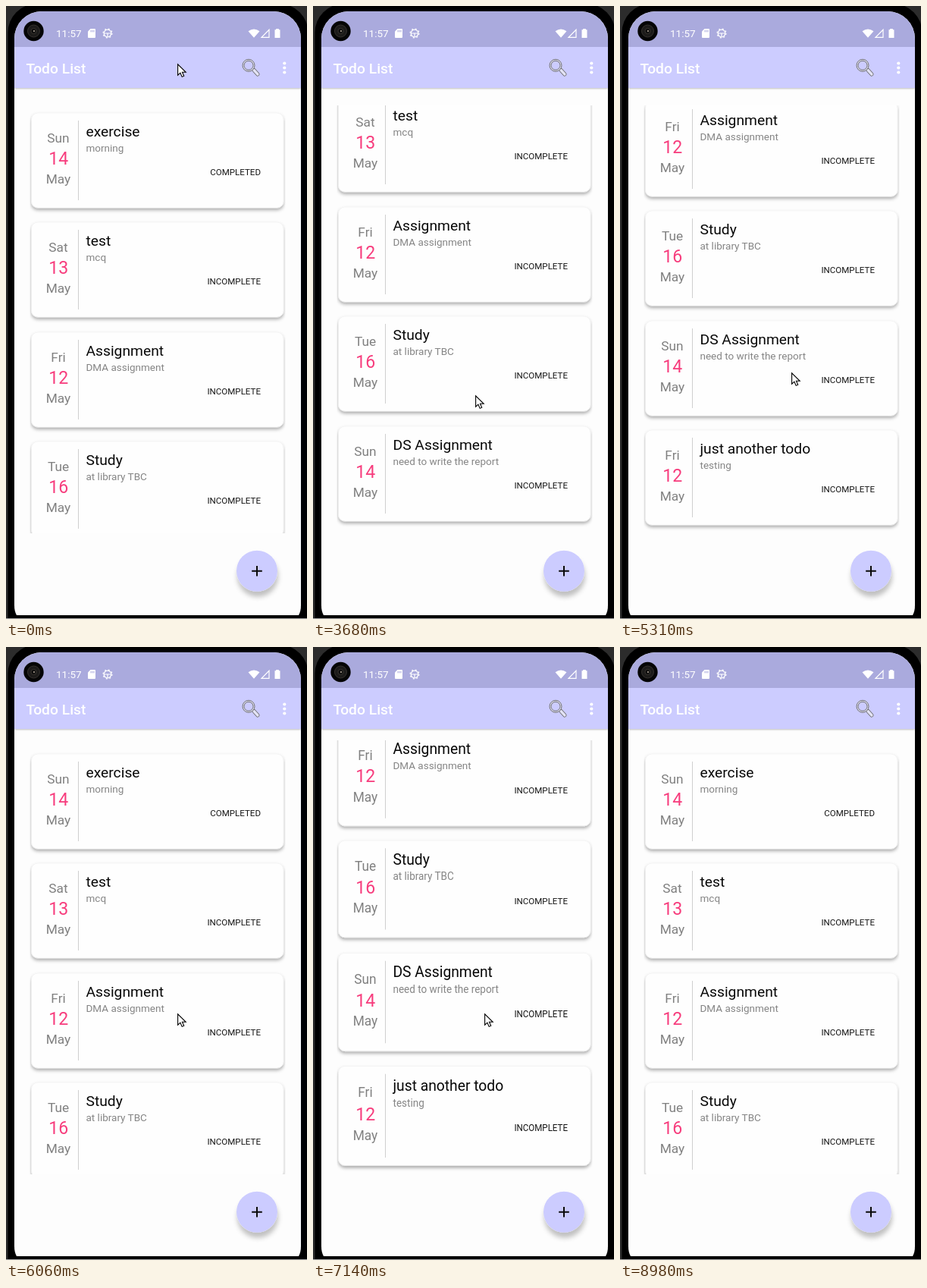
Animation of 397x808 px, one loop 9790 ms. Source, as an HTML page:

```html
<!DOCTYPE html>
<html lang="en">
<head>
<meta charset="utf-8">
<title>Todo List</title>
<style>
  html, body { margin: 0; width: 100%; height: 100%; overflow: hidden; background: #000; }
  svg { display: block; width: 397px; height: 808px; font-family: Roboto, sans-serif; }
  .day { font-size: 17.3px; fill: #808080; text-anchor: middle; }
  .date { font-size: 23.1px; fill: #f73d7d; text-anchor: middle; }
  .title { font-size: 19.26px; fill: #080808; }
  .note { font-size: 13.5px; fill: #858585; }
  .status { font-size: 11.56px; fill: #151515; text-anchor: end; }
</style>
</head>
<body>
<svg viewBox="0 0 397 808">
  <defs>
    <clipPath id="listClip"><rect id="listBox" x="31.5" width="337"/></clipPath>
    <clipPath id="screenClip"><path d="M11 43a36 36 0 0 1 36-36H353a36 36 0 0 1 36 36V790Q389 798 386 803H14Q11 798 11 790Z"/></clipPath>
    <filter id="cardShadow" x="-5%" y="-10%" width="110%" height="125%">
      <feDropShadow dx="0" dy="2.8" stdDeviation="1.9" flood-opacity=".32"/>
    </filter>
    <filter id="fabShadow" x="-30%" y="-30%" width="160%" height="170%">
      <feDropShadow dx="1" dy="7" stdDeviation="3.2" flood-opacity=".24"/>
    </filter>
    <filter id="barShadow" x="-5%" y="-10%" width="110%" height="130%">
      <feDropShadow dx="0" dy="1" stdDeviation="1" flood-opacity=".25"/>
    </filter>
  </defs>

  <rect width="397" height="808" fill="#2c2c2c"/>
  <rect x="2.5" y="-3" width="396" height="860" rx="38" fill="#000"/>
  <rect y="807" width="397" height="1" fill="#aaa"/>

  <g clip-path="url(#screenClip)">
    <rect x="11" y="7" width="378" height="797" fill="#fdfdfd"/>
    <rect x="11" y="50" width="378" height="58" fill="#ccccff" filter="url(#barShadow)"/>
    <rect x="11" y="7" width="378" height="47" fill="#aaaadd"/>
  </g>

  <!-- camera -->
  <circle cx="36.5" cy="33" r="13.2" fill="#050505"/>
  <circle cx="36.5" cy="33" r="8" fill="#1c1b1a" stroke="#34312e"/>
  <circle cx="36.5" cy="33" r="3.6" fill="#0b0b0b" stroke="#38342f"/>
  <circle cx="37" cy="33" r="1.2" fill="#8d8478"/>

  <!-- status bar -->
  <g fill="#fff">
    <text x="66" y="41" font-size="13.5">11:57</text>
    <path d="M111.5 30H117a1 1 0 0 1 1 1V41a1 1 0 0 1-1 1H109a1 1 0 0 1-1-1V33.5Z"/>
    <path d="M112 31.8v2.6M114 31.8v2.6M116 31.8v2.6" stroke="#aaaadd"/>
    <circle cx="134" cy="36" r="4.8" fill="none" stroke="#fff" stroke-width="1.3"/>
    <circle cx="134" cy="36" r="6" fill="none" stroke="#fff" stroke-width="1.2" stroke-dasharray="2 2.712"/>
    <path d="M130 36H138M134 36V40" stroke="#fff" stroke-width="1.2"/>
    <path d="M319.5 33.3Q327 27.5 334.5 33.3L327 41.8Z"/>
    <path d="M337 41.3H347V31.3Z" fill="none" stroke="#fff" stroke-width="1.2"/>
    <path d="M356.2 30H359.8V31.2H361.5V42H354.5V31.2H356.2Z"/>
  </g>

  <!-- app bar -->
  <text x="26.4" y="89" font-size="19.26" font-weight="500" fill="#fff">Todo List</text>
  <g stroke-linecap="round">
    <path d="M327 84.5L332 90" stroke="#666" stroke-width="5"/>
    <path d="M327 84.5L332 90" stroke="#e2e2f4" stroke-width="3.4"/>
  </g>
  <g fill="none" stroke="#666" stroke-width=".9">
    <circle cx="320" cy="78.3" r="7" stroke="#dcdcf2" stroke-width="2.2"/>
    <circle cx="320" cy="78.3" r="8"/>
    <circle cx="320" cy="78.3" r="6"/>
  </g>
  <g fill="#fff">
    <circle cx="367.3" cy="75.5" r="2.1"/><circle cx="367.3" cy="81.5" r="2.1"/><circle cx="367.3" cy="87.5" r="2.1"/>
  </g>

  <g id="list" clip-path="url(#listClip)"></g>

  <circle cx="331" cy="744.7" r="27" fill="#ccccff" filter="url(#fabShadow)"/>
  <path d="M324.2 744.7H337.8M331 737.9V751.5" stroke="#0a0a0a" stroke-width="2"/>

  <path id="cursor" d="M.6 .8V15.2L3.9 12.2L6.2 17.4L8.7 16.3L6.5 11.3H11.2Z" fill="#fff" stroke="#000" stroke-width="1.1"/>
</svg>

<script>
const LOOP = 9790;
const FIRST_TOP = 141, CARD_HEIGHT = 125, PITCH = 144.5;
const LIST_TOP = 131, LIST_BOTTOM = 695, END = 304;

const todos = [
  ['Sun', 14, 'exercise', 'morning', 'COMPLETED'],
  ['Sat', 13, 'test', 'mcq', 'INCOMPLETE'],
  ['Fri', 12, 'Assignment', 'DMA assignment', 'INCOMPLETE'],
  ['Tue', 16, 'Study', 'at library TBC', 'INCOMPLETE'],
  ['Sun', 14, 'DS Assignment', 'need to write the report', 'INCOMPLETE'],
  ['Fri', 12, 'just another todo', 'testing', 'INCOMPLETE'],
];

// [time, x, y]; no position hides the pointer
const pointerSteps = [
  [0, 226, 76], [130, 219, 75], [2590, 214, 153], [2730, 196, 275], [2860, 191, 410],
  [3000, 205, 500], [3130, 214, 513], [5190, 226, 483],
  [8540, 292, 628], [8680, 342, 750], [8830, 359, 794], [8980],
];

// [time, scroll, pull]; pull > 0 stretches past the end, < 0 past the start
const scrollSteps = [
  [0, 0, 0],
  [3680, 165, 0], [3820, END, .6], [3950, END, 1], [4090, END, .4], [4230, END, 0],
  [5340, 150, 0], [5480, 0, -.5], [5630, 0, -1], [5770, 0, -.7], [5920, 0, -.25], [6060, 0, 0],
  [6540, 130, 0], [6690, END, .4], [6840, END, .9], [6990, END, 1], [7140, END, 1],
  [7290, END, .35], [7440, END, 0],
  [7720, 57, 0], [7840, 0, -.5], [7980, 0, -1], [8120, 0, -.6], [8260, 0, -.2], [8400, 0, 0],
];

const list = document.getElementById('list');
const listBox = document.getElementById('listBox');
const cursor = document.getElementById('cursor');

const label = (cls, x, y, text) => `<text class="${cls}" x="${x}" y="${y}">${text}</text>`;

list.innerHTML = todos.map(([day, date, title, note, status]) => `<g>
  <rect x="33.5" width="332.5" height="${CARD_HEIGHT}" rx="8.5" fill="#fefefe" stroke="#eee" stroke-width=".6" filter="url(#cardShadow)"/>
  <path d="M95.5 10V115" stroke="#cfcfcf"/>
  ${label('day', 69, 39, day)}${label('date', 69.3, 68, date)}${label('day', 69, 93, 'May')}
  ${label('title', 105.5, 31, title)}${label('note', 105.5, 51, note)}${label('status', 336, 82, status)}
</g>`).join('');
const cards = [...list.children];

const stepAt = (steps, t) => steps.findLast(([start]) => start <= t);

// Overscroll stretch: strongest beside the edge being pulled.
function stretch(y, pull) {
  const d = pull > 0 ? LIST_BOTTOM - y : y - LIST_TOP;
  return y - pull * (.055 * d - .000047 * d * d);
}

function draw(t) {
  const [, scroll, pull] = stepAt(scrollSteps, t);
  cards.forEach((card, i) => {
    const y = Math.floor(FIRST_TOP + i * PITCH - scroll);
    const top = stretch(y, pull);
    const scale = (stretch(y + CARD_HEIGHT, pull) - top) / CARD_HEIGHT;
    card.setAttribute('transform', `translate(0 ${top}) scale(1 ${scale})`);
  });
  const top = LIST_TOP - 8 * Math.max(0, pull);
  const bottom = LIST_BOTTOM + 7 * Math.max(0, -pull);
  listBox.setAttribute('y', top);
  listBox.setAttribute('height', bottom - top);

  const [, x, y] = stepAt(pointerSteps, t);
  cursor.setAttribute('visibility', x === undefined ? 'hidden' : 'visible');
  if (x !== undefined) cursor.setAttribute('transform', `translate(${x} ${y})`);
}

function tick() {
  draw(performance.now() % LOOP);
  requestAnimationFrame(tick);
}
tick();
</script>
</body>
</html>
```
